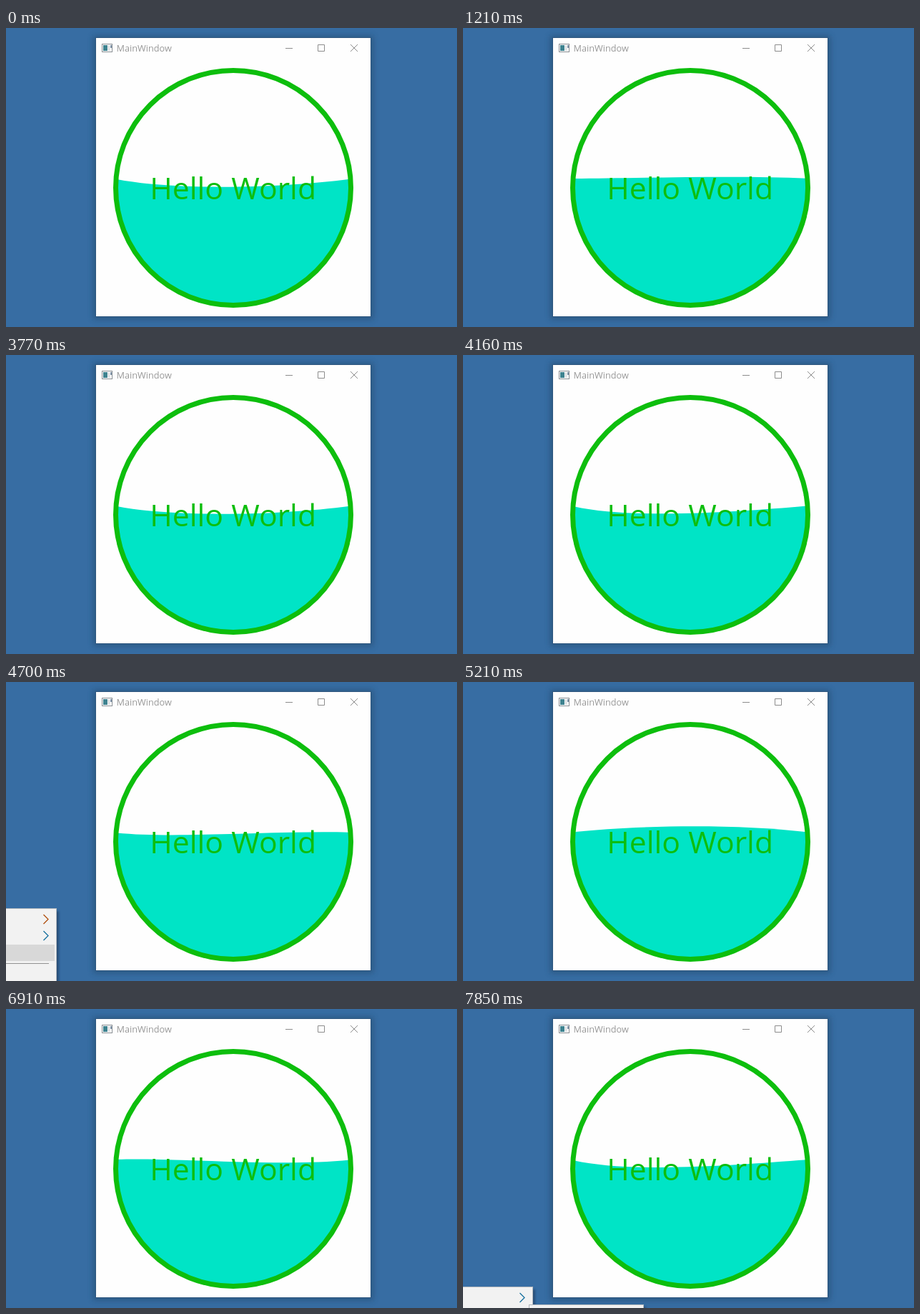
Animation, 631 px wide and 419 px high, one loop 8 s. Source, as an HTML page:

```html
<!DOCTYPE html>
<html lang="en">
<head>
<meta charset="utf-8">
<title>Water gauge</title>
<style>
  html, body { margin: 0; width: 100%; height: 100%; overflow: hidden; background: #376da3; }
  svg { display: block; width: 631px; height: 419px; }
  text { font-family: "Open Sans", "Noto Sans", sans-serif; }
  .line { fill: none; stroke: #8c8c8c; }
  .panel { fill: #f2f2f2; stroke: #b4b9be; }
  .shade { fill: #1c3653; opacity: .55; filter: url(#soft); }
  .arrow { fill: none; stroke: #16709f; stroke-width: 1.3; }
  .popup { visibility: hidden; }
</style>
</head>
<body>
<svg viewBox="0 0 631 419">
  <defs>
    <filter id="blur" x="-10%" y="-10%" width="120%" height="120%"><feGaussianBlur stdDeviation="4"/></filter>
    <filter id="soft" x="-20%" y="-20%" width="140%" height="140%"><feGaussianBlur stdDeviation="1.5"/></filter>
    <clipPath id="bowl"><circle cx="318" cy="224" r="163"/></clipPath>
    <path id="chevron" d="M0 0l6.500 6.500L0 13"/>
  </defs>
  <rect width="631" height="419" fill="#376da3"/>

  <!-- window -->
  <rect x="122" y="11" width="392" height="397" fill="#1e3c5c" opacity=".45" filter="url(#blur)"/>
  <rect x="125.5" y="13.5" width="385" height="391" fill="none" stroke="#2f577f"/>
  <rect x="126" y="14" width="384" height="390" fill="#fefefe"/>
  <g shape-rendering="crispEdges">
    <rect x="134.5" y="22.5" width="14" height="11" fill="#fff" stroke="#8a8f94"/>
    <rect x="136" y="24" width="6" height="8" fill="#3f8390"/>
    <rect x="143" y="24" width="2" height="8" fill="#d5dade"/>
    <rect x="146" y="24" width="2" height="4" fill="#7f93a8"/>
  </g>
  <text x="154.5" y="33" font-size="12.7" fill="#999">MainWindow</text>
  <path class="line" d="M391 28.5h10M436.5 23.5h9v9h-9zM482 23l10 10M492 23l-10 10"/>

  <!-- gauge -->
  <path id="water" fill="#00e4c6" clip-path="url(#bowl)"/>
  <circle cx="318" cy="224" r="164.5" fill="none" stroke="#0dbe0d" stroke-width="7"/>
  <text x="317.7" y="240" font-size="42.7" text-anchor="middle" fill="#0dbe0d">Hello World</text>

  <!-- popups -->
  <g class="popup" data-from="4280" data-to="5090">
    <rect class="shade" x="-10" y="321" width="84" height="110"/>
    <rect class="panel" x="-5.5" y="317.5" width="76" height="110"/>
    <rect y="368" width="68" height="23" fill="#d8d8d8"/>
    <path d="M0 394.5H60" stroke="#919191"/>
    <use href="#chevron" x="52.5" y="326" class="arrow" style="stroke: #b0500f"/>
    <use href="#chevron" x="52.5" y="349" class="arrow"/>
  </g>
  <g class="popup" data-from="5360" data-to="6210">
    <rect y="386" width="88" height="23" fill="#87a5c2"/>
  </g>
  <g class="popup" data-from="7580" data-to="8000">
    <rect class="shade" x="-10" y="393" width="111" height="40"/>
    <rect class="panel" x="-5.5" y="389.5" width="103" height="40"/>
    <use href="#chevron" x="79.5" y="398" class="arrow"/>
  </g>
  <g class="popup" data-from="7850" data-to="8000">
    <rect class="shade" x="95" y="417" width="161" height="20"/>
    <rect class="panel" x="92.5" y="414.5" width="160" height="20"/>
  </g>
</svg>
<script>
  const LOOP = 8000, STEP = LOOP / 60;
  const LEVEL = 211, LEFT = 150, RIGHT = 486, WIDTH = RIGHT - LEFT;

  const water = document.getElementById("water");
  const popups = [...document.querySelectorAll(".popup")];

  const swing = (t, size, crest, period) => size * Math.cos(2 * Math.PI * (t - crest) / period);

  // Two handles of one curve bob at slightly different rates.
  function surface(t) {
    const y1 = LEVEL - 2 + swing(t, 22.5, 385, 3730);
    const y2 = LEVEL + swing(t, 14, 170, 3530);
    return `M${LEFT} ${LEVEL}C${LEFT + WIDTH * .25} ${y1} ${LEFT + WIDTH * .7} ${y2} ${RIGHT} ${LEVEL}V392H${LEFT}Z`;
  }

  function draw() {
    const t = performance.now() % LOOP;
    water.setAttribute("d", surface((Math.floor(t / STEP) + .5) * STEP));
    for (const p of popups) {
      const shown = t >= +p.dataset.from && t < +p.dataset.to;
      p.style.visibility = shown ? "visible" : "hidden";
    }
    requestAnimationFrame(draw);
  }
  draw();
</script>
</body>
</html>
```
